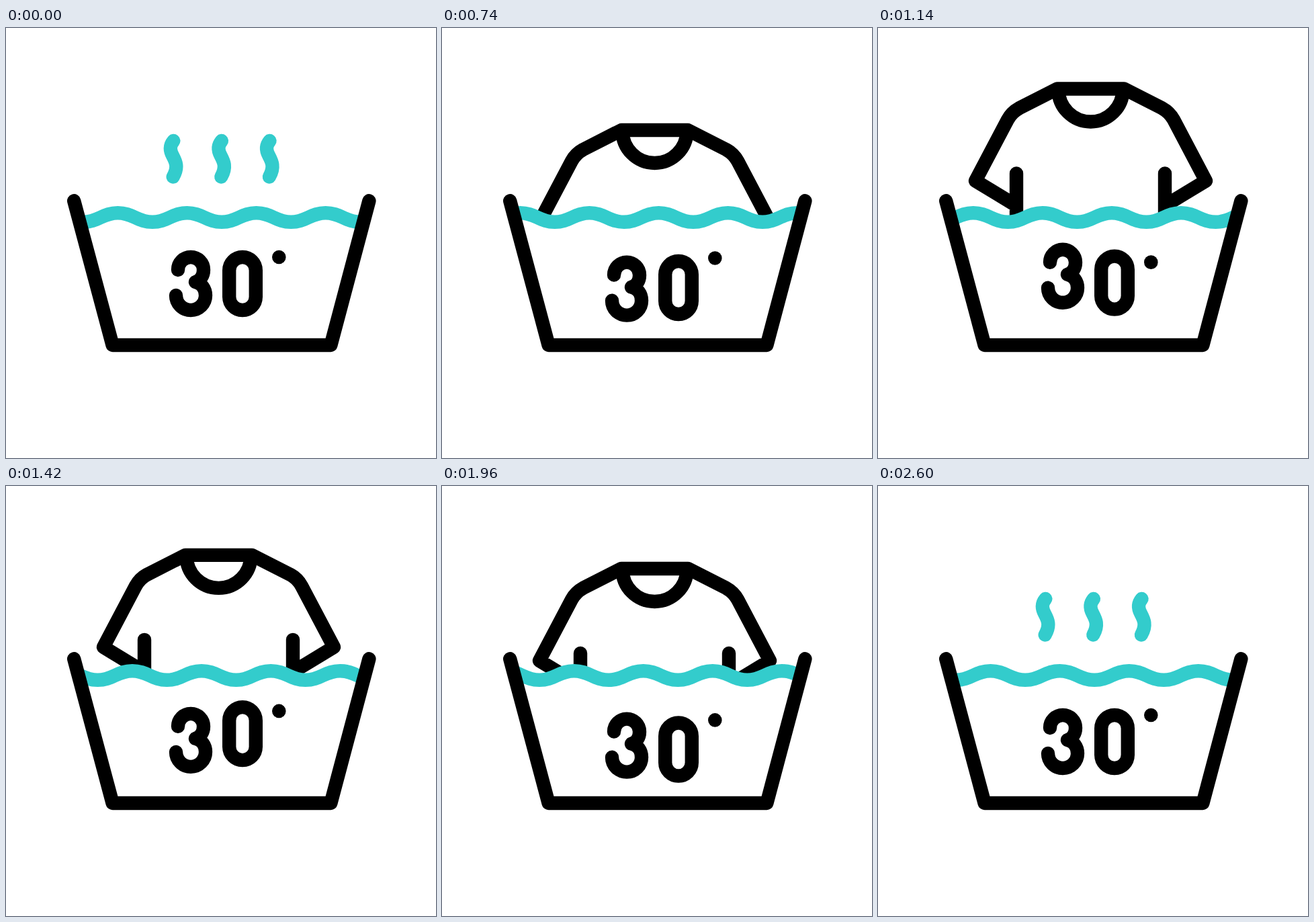
An HTML page for the animation above (3 s loop, 640 by 640 pixels).

```html
<!DOCTYPE html>
<html lang="en">
<head>
<meta charset="utf-8">
<title>Wash at 30 degrees</title>
<style>
  html, body { margin: 0; width: 100%; height: 100%; overflow: hidden; background: #fff; }
  svg { display: block; width: 100vw; height: 100vh; }
  .line { fill: none; stroke: #000; stroke-width: 20.4; stroke-linecap: round; stroke-linejoin: round; }
  .water { stroke: #3cc; }
</style>
</head>
<body>
<svg viewBox="0 0 640 640">
  <defs>
    <clipPath id="inside"><path d="M101 257L158.5 472H483.5L540.5 257Z"/></clipPath>
    <clipPath id="above"><path id="sky"/></clipPath>
  </defs>
  <g clip-path="url(#above)">
    <g id="shirt" class="line">
      <path d="M206 300V126M206 174L145 137L193 46Q199 35 210 29L267 0H366L423 29Q434 35 440 46L488 137L427 174M427 126V300"/>
      <path d="M268.5 1A48 48 0 0 0 364.5 1"/>
    </g>
  </g>
  <g clip-path="url(#inside)"><path id="wave" class="line water"/></g>
  <g id="steam" class="line water"></g>
  <path class="line" d="M101.2 257.3L158.6 472H483.4L540.4 257.3"/>
  <path id="three" class="line" d="M256 360A19 19 0 0 1 294 360C294 369 289 376 282 378C291 380 297 388 297 398A22 22 0 0 1 253 398"/>
  <rect id="zero" class="line" x="332.2" y="341" width="39.6" height="79" rx="19.8"/>
  <circle id="dot" cx="406.3" cy="341" r="10.3"/>
</svg>
<script>
const LOOP = 3000, STEP = 20, PERIOD = 103.1;
const $ = id => document.getElementById(id);

const bez = (a, b, s) => 3 * (1 - s) * (1 - s) * s * a + 3 * (1 - s) * s * s * b + s * s * s;

// Eased progress; x1 and x2 are the handle lengths.
function ease(u, x1 = 1 / 3, x2 = 2 / 3) {
  if (u <= 0) return 0;
  if (u >= 1) return 1;
  let lo = 0, hi = 1;
  for (let i = 0; i < 24; i++) {
    const mid = (lo + hi) / 2;
    if (bez(x1, x2, mid) < u) lo = mid; else hi = mid;
  }
  return bez(0, 1, lo);
}

// Each key is [time, value, optional handles of the move into it].
function track(keys, t) {
  if (t <= keys[0][0]) return keys[0][1];
  for (let i = 1; i < keys.length; i++) {
    const [t0, v0] = keys[i - 1], [t1, v1, h = []] = keys[i];
    if (t < t1) return v0 + (v1 - v0) * ease((t - t0) / (t1 - t0), ...h);
  }
  return keys[keys.length - 1][1];
}

const bob = [[200, 0], [700, 8], [1200, -12], [1700, 12], [2200, 0]];
const drift = [[200, 0], [800, 54.5], [2600, 310.4]];
const lift = [[400, 380], [900, 79.3], [1400, 103], [1800, 79.3], [2500, 291, [0.175, 0.7]]];

const puffs = [0, 71.6, 143.2].map(x => {
  const p = document.createElementNS("http://www.w3.org/2000/svg", "path");
  p.setAttribute("d", "M248.7 221.5C257 207 252.5 198.5 248 190S243.5 175 249.3 168");
  p.setAttribute("pathLength", 100);
  $("steam").append(p);
  return { p, x };
});

function waveLine(shift) {
  const half = PERIOD / 2, k = half * 0.43;
  let x = 166.4 + shift % PERIOD - 3 * PERIOD, y = 275.2;
  let d = `M${x} ${y}`;
  for (let i = 0; i < 16; i++) {
    const nx = x + half, ny = 564 - y;
    d += `C${x + k} ${y} ${nx - k} ${ny} ${nx} ${ny}`;
    x = nx;
    y = ny;
  }
  return d;
}

const move = (el, x, y) => el.setAttribute("transform", `translate(${x} ${y})`);

function drawSteam(t) {
  const out = ease((t - 200) / 400), back = ease((t - 2200) / 400);
  const leaving = t < 1400;
  const from = leaving ? out * 100 : 0;
  const to = leaving ? 100 : back * 100;
  const y = leaving ? -19.5 * out : 19.5 * (1 - back);
  $("steam").style.display = to - from > 0.01 ? "" : "none";
  for (const { p, x } of puffs) {
    move(p, x, y);
    p.setAttribute("stroke-dasharray", to - from > 99.9 ? "none" : `${to - from} 300`);
    p.setAttribute("stroke-dashoffset", -from);
  }
}

function draw(t) {
  const d = waveLine(track(drift, t));
  $("wave").setAttribute("d", d);
  $("sky").setAttribute("d", d + "V-50H-300Z");
  move($("shirt"), 0, track(lift, t));
  ["three", "zero", "dot"].forEach((id, i) => move($(id), 0, track(bob, t - 200 * i)));
  drawSteam(t);
}

function tick() {
  const t = performance.now() % LOOP;
  draw(Math.floor(t / STEP) * STEP);
  requestAnimationFrame(tick);
}
tick();
</script>
</body>
</html>
```
